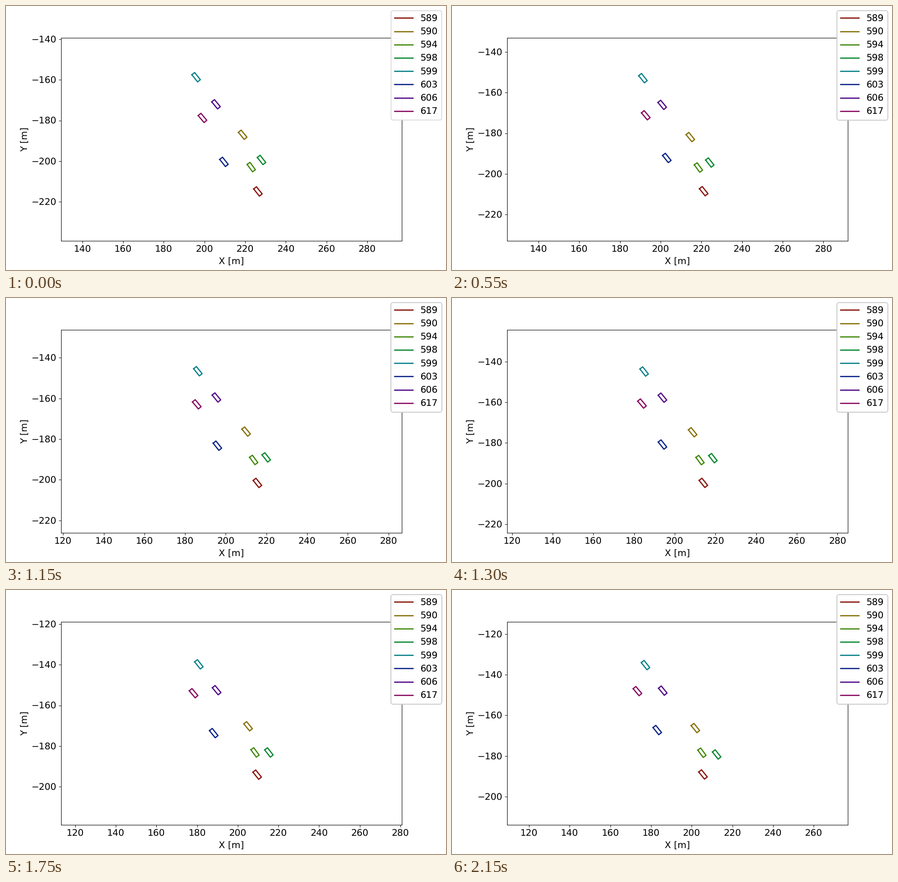
Write a matplotlib script that moves like this. It is 966 px wide and 580 px high and loops after 2.2 s.

```python
import colorsys

import matplotlib.pyplot as plt
import numpy as np
from matplotlib.animation import FuncAnimation
from matplotlib.lines import Line2D
from matplotlib.ticker import MultipleLocator

FRAMES, STEP_MS = 44, 50
WIDTH, HEIGHT, DPI = 966, 580, 100
SPAN_Y = 100.0                      # visible metres, vertically
CAR_LENGTH, CAR_WIDTH = 4.5, 1.75   # metres
HOLD_EVERY = 22                     # steps from one held position to the next
BRAKE = 0.02                        # slight slowing over the drive

plt.rcParams.update({
    "font.family": "DejaVu Sans",
    "font.size": 14.5,
    "text.hinting": "no_hinting",
    "lines.linewidth": 1.93,
    "legend.labelspacing": 0.49,
})

# id: start x, start y (m), distance driven (m), heading (deg above leftward)
CARS = {
    589: (226.30, -214.89, 33.1, 51.2),
    590: (218.80, -187.01, 26.8, 50.7),
    594: (223.03, -202.91, 30.4, 53.7),
    598: (228.07, -199.40, 25.6, 51.9),
    599: (195.91, -158.69, 29.9, 51.5),
    603: (209.60, -200.34, 42.4, 51.3),
    606: (205.70, -172.01, 31.3, 50.5),
    617: (199.05, -178.73, 40.0, 50.0),
}
x0, y0, dist, heading = np.array(list(CARS.values())).T
start = np.column_stack([x0, y0])
angle = np.radians(heading)
ahead = np.column_stack([-np.cos(angle), np.sin(angle)])
aside = np.column_stack([np.sin(angle), np.cos(angle)])

# Closed outlines around each car's centre, from the left corner on
CORNERS = [(1, -1), (1, 1), (-1, 1), (-1, -1), (1, -1)]
outlines = np.stack([i * ahead * CAR_LENGTH / 2 + j * aside * CAR_WIDTH / 2
                     for i, j in CORNERS], axis=1)

fig, ax = plt.subplots(figsize=(WIDTH / DPI, HEIGHT / DPI), dpi=DPI)
pos = ax.get_position()
half = np.array([pos.width * WIDTH / (pos.height * HEIGHT), 1]) * SPAN_Y / 2

ax.set_xlabel("X [m]")
ax.set_ylabel("Y [m]")
ax.xaxis.set_major_locator(MultipleLocator(20))
ax.yaxis.set_major_locator(MultipleLocator(20))

colors = [colorsys.hls_to_rgb(0.01 + i / len(CARS), 0.3, 0.8)
          for i in range(len(CARS))]
boxes = [ax.plot([], [], color=c)[0] for c in colors]
handles = [Line2D([], [], color=c) for c in colors]

# A new translucent legend is laid over the others at every step
legends = [fig.legend(handles, [str(i) for i in CARS], loc="upper right")
           for _ in range(FRAMES + 1)]


def tick(k):
    """Data step shown at step k; one position per period is held."""
    return k - (k + HOLD_EVERY - 1) // HOLD_EVERY


def update(k):
    u = tick(k) / tick(FRAMES - 1)
    travel = dist * (u + BRAKE * u * (1 - u))
    centers = start + travel[:, None] * ahead

    # The view follows the mean position of all cars
    low, high = centers.mean(axis=0) - half, centers.mean(axis=0) + half
    ax.set_xlim(low[0], high[0])
    ax.set_ylim(low[1], high[1])

    for box, center, outline in zip(boxes, centers, outlines):
        box.set_data(*(center + outline).T)
    for i, legend in enumerate(legends):
        legend.set_visible(i < k + 2)
    return boxes


anim = FuncAnimation(fig, update, frames=FRAMES, interval=STEP_MS,
                     repeat=True, repeat_delay=0, blit=False)
plt.show()
```
